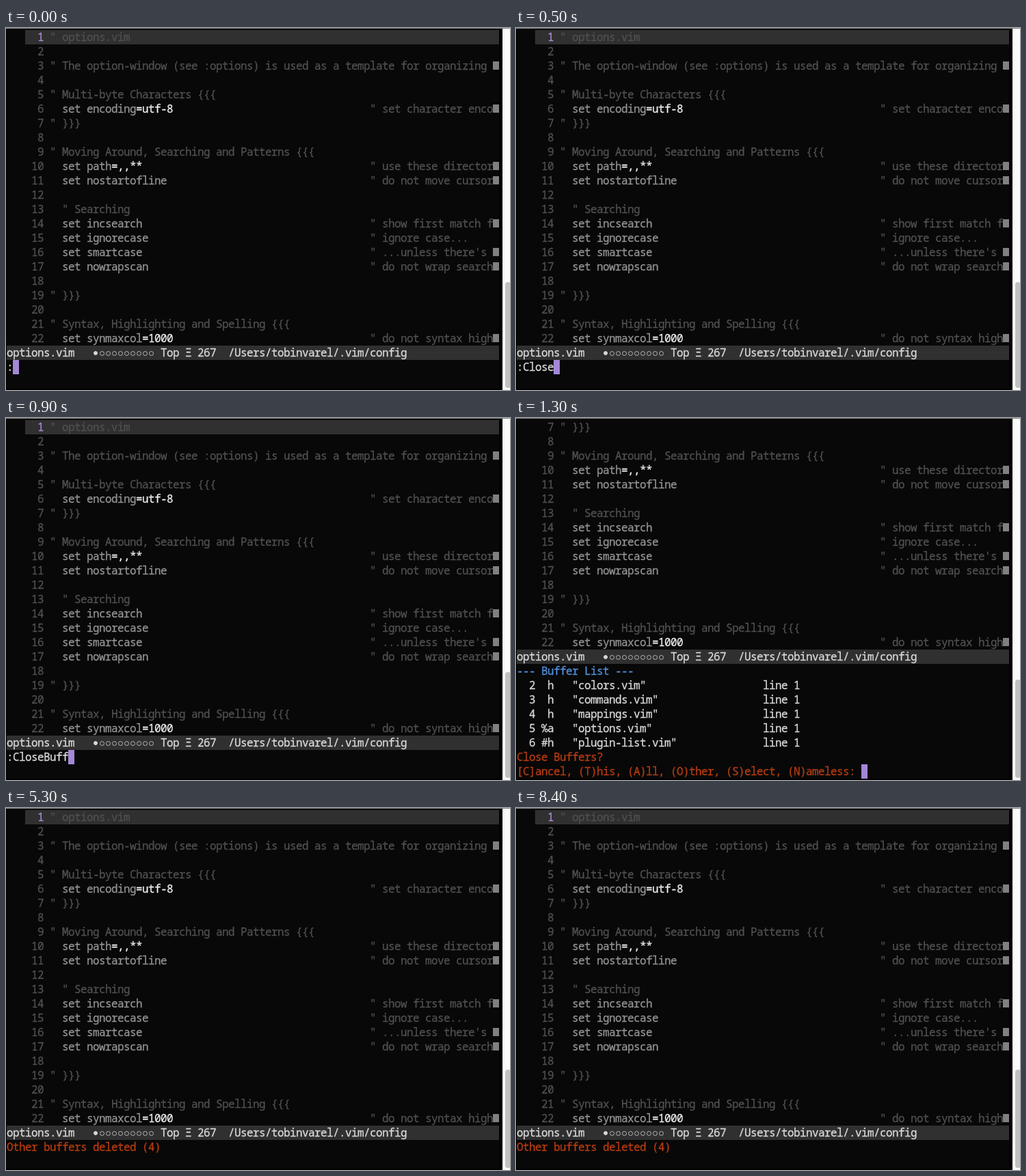
An HTML page for the animation above (8.6 s loop, 737 by 530 pixels).

```html
<!DOCTYPE html>
<html lang="en">
<head>
<meta charset="utf-8">
<title>Closing buffers</title>
<style>
  html, body { margin: 0; width: 100%; height: 100%; overflow: hidden; background: #000; }
  #stage {
    position: absolute; left: 0; top: 0; width: 737px; height: 530px;
    overflow: hidden; background: #000;
    font: 500 16px/20px "Noto Sans Mono", "DejaVu Sans Mono", monospace;
    font-variant-ligatures: none;
    letter-spacing: calc(9px - 1ch); /* terminal cell pitch */
    -webkit-text-stroke: 0.3px;
  }
  #stage * { position: absolute; }
  #edge { left: 0; top: 0; width: 737px; height: 1px; background: #858585; }
  #screen { left: 1px; top: 3px; width: 720px; height: 525px; overflow: hidden; background: #080808; }
  #buffer, #list { left: 0; top: 0; width: 720px; height: 525px; }
  #track { left: 726px; top: 1px; width: 11px; height: 529px; background: #fafafa; }
  #thumb { left: 730px; width: 8px; border-radius: 4px; background: #c1c1c1; }
  .text { white-space: pre; height: 21px; }
  .bar { height: 21px; background: #303030; }
  .more { width: 9px; height: 12px; margin-top: 4px; background: #808080; }
  .dot {
    box-sizing: border-box; width: 7px; height: 7px; margin: 8px 0 0 1px;
    border: 1px solid #b8b8b8; border-radius: 50%;
  }
  .full { width: 6px; height: 6px; background: #d8d8d8; border-color: #d8d8d8; }
  .dim { color: #505050; }
  .mid { color: #949494; }
  .lit { color: #dadada; }
  .value { color: #f0f0f0; }
  .now { color: #a88bd8; }
  .head { color: #5290dc; }
  .ask { color: #b83c10; }
  #cursor { width: 9px; height: 21px; background: #a487d6; color: #080808; }
</style>
</head>
<body>
<div id="stage">
  <div id="edge"></div>
  <div id="screen">
    <div id="buffer"></div>
    <div id="list"></div>
    <div id="command" class="text"></div>
    <div id="cursor" class="text"></div>
  </div>
  <div id="track"></div>
  <div id="thumb"></div>
</div>
<script>
const COL = 9, ROW = 21, LOOP = 8600;
const $ = id => document.getElementById(id);
const buffer = $("buffer"), list = $("list"), command = $("command"),
      cursor = $("cursor"), thumb = $("thumb");

function place(el, row, col) {
  el.style.left = col * COL + "px";
  el.style.top = row * ROW + "px";
}

function add(parent, row, col, cls, text = "") {
  const el = document.createElement("div");
  el.className = cls;
  el.textContent = text;
  place(el, row, col);
  parent.append(el);
  return el;
}

const write = (parent, row, col, tone, text) =>
  add(parent, row, col, "text " + tone, text);

function bar(row, col) {
  add(buffer, row, col, "bar").style.width = (80 - col) * COL + "px";
}

// Each line: code, value, trailing comment
const lines = [
  ['" options.vim'],
  [""],
  ['" The option-window (see :options) is used as a template for organizing '],
  [""],
  ['" Multi-byte Characters {{{'],
  ["  set encoding", "=utf-8", "set character enco"],
  ['" }}}'],
  [""],
  ['" Moving Around, Searching and Patterns {{{'],
  ["  set path", "=,,**", "use these director"],
  ["  set nostartofline", "", "do not move cursor"],
  [""],
  ['  " Searching'],
  ["  set incsearch", "", "show first match f"],
  ["  set ignorecase", "", "ignore case..."],
  ["  set smartcase", "", "...unless there's "],
  ["  set nowrapscan", "", "do not wrap search"],
  [""],
  ['" }}}'],
  [""],
  ['" Syntax, Highlighting and Spelling {{{'],
  ["  set synmaxcol", "=1000", "do not syntax high"],
];

bar(0, 3);
lines.forEach(([code, value, note], row) => {
  write(buffer, row, 4, row ? "dim" : "now", String(row + 1).padStart(2));
  write(buffer, row, 7, code.startsWith("  set") ? "mid" : "dim", code);
  if (value) write(buffer, row, 7 + code.length, "value", value);
  if (note) write(buffer, row, 59, "dim", '" ' + note);
  const end = note ? 61 + note.length : 7 + code.length;
  if (end === 79) add(buffer, row, end, "more");
});

bar(22, 0);
write(buffer, 22, 0, "lit", "options.vim");
for (let i = 0; i < 10; i++) add(buffer, 22, 14 + i, i ? "dot" : "dot full");
write(buffer, 22, 25, "lit", "Top Ξ 267  /Users/tobinvarel/.vim/config");

write(list, 17, 0, "head", "--- Buffer List ---");
[[" h", "colors"], [" h", "commands"], [" h", "mappings"], ["%a", "options"], ["#h", "plugin-list"]]
  .forEach(([flag, name], i) => {
    const entry = `  ${i + 2} ${flag}   "${name}.vim"`;
    write(list, 18 + i, 0, "lit", entry.padEnd(40) + "line 1");
  });
write(list, 23, 0, "ask", "Close Buffers?");
const prompt = "[C]ancel, (T)his, (A)ll, (O)ther, (S)elect, (N)ameless: ";
write(list, 24, 0, "ask", prompt);

place(command, 23, 0);

function showCursor(row, col, char = "") {
  cursor.hidden = false;
  cursor.textContent = char;
  place(cursor, row, col);
}

function draw(t) {
  const typing = t < 1300, asking = !typing && t < 5300;
  buffer.style.top = asking ? -6 * ROW + "px" : "0";
  list.hidden = !asking;
  command.hidden = asking;
  command.className = typing ? "text lit" : "text ask";
  thumb.style.top = (typing ? 372 : 383) + "px";
  thumb.style.height = (typing ? 155 : 144) + "px";
  cursor.hidden = true;

  if (typing) {
    const typed = ":" + "CloseBuffers".slice(0, Math.floor(t / 100));
    command.textContent = typed;
    showCursor(23, typed.length);
  } else if (asking) {
    showCursor(24, prompt.length);
  } else {
    command.textContent = "Other buffers deleted (4)";
    if (t >= 8300 && t < 8400) showCursor(0, 7, '"');
  }
}

function tick() {
  draw(performance.now() % LOOP);
  requestAnimationFrame(tick);
}
tick();
</script>
</body>
</html>
```
